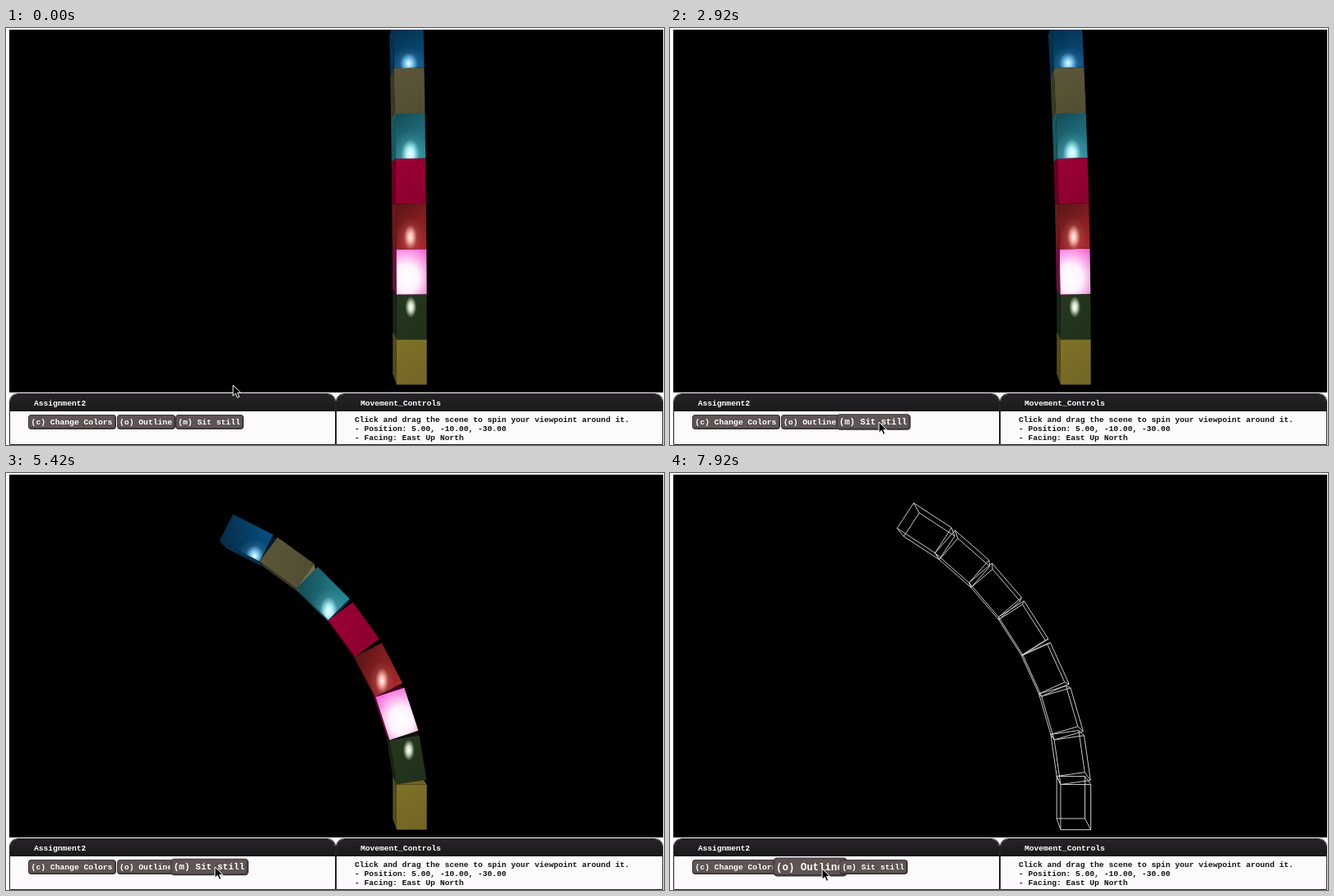
An HTML page with a canvas that plays this animation: 800x508 px, repeating every 8 s.

```html
<!DOCTYPE html>
<html lang="en">
<head>
<meta charset="utf-8">
<title>Swaying boxes</title>
<style>
  html, body { margin: 0; width: 100%; height: 100%; overflow: hidden; background: #fff; }
  #stage { position: relative; width: 800px; height: 508px; overflow: hidden;
    font: bold 9.6px/11px "Liberation Mono", monospace; white-space: pre; }
  #stage > * { position: absolute; }
  canvas { left: 0; top: 0; }
  .panel { box-sizing: border-box; top: 445px; height: 63px; background: #fdfafd;
    border: 1px solid #222; border-radius: 10px 10px 0 0; overflow: hidden; }
  .panel h1 { margin: 0; height: 21px; padding-left: 29px; background: linear-gradient(#262326, #1a181a);
    color: #fff; font: inherit; line-height: 24px; }
  .panel p { margin: 5px 0 0 22px; color: #111; }
  .button { box-sizing: border-box; top: 471px; height: 18px; border-radius: 4px;
    background: #5e5454; border: 1px solid #3c3535; border-width: 1px 2px 2px 1px;
    color: #fff; text-align: center; font-size: 9.7px; line-height: 17px; }
</style>
</head>
<body>
<div id="stage">
  <canvas id="scene" width="800" height="508"></canvas>
  <div class="panel" style="left:4px;width:397px"><h1>Assignment2</h1></div>
  <div class="panel" style="left:401px;width:398px"><h1>Movement_Controls</h1><p>Click and drag the scene to spin your viewpoint around it.
- Position: 5.00, -10.00, -30.00
- Facing: East Up North</p></div>
  <div class="button" style="left:27px;width:107px">(c) Change Colors</div>
  <div class="button" id="outline" style="left:135px;width:71px">(o) Outline</div>
  <div class="button" id="still" style="left:206px;width:83px">(m) Sit still</div>
  <svg id="cursor" width="14" height="19" style="left:-1px;top:-1px">
    <path d="M1 1V14.2L4.2 11.3 6.4 16.3 8.6 15.3 6.5 10.4H10.6Z" fill="#000" stroke="#fff"/>
  </svg>
</div>
<script>
const LOOP = 8000, FPS = 12;
const EYE = { x: 401.5, y: 223.5, focal: 532.3 };
const MAX_ANGLE = 0.05 * Math.PI;
const STILL_SPANS = [[2960, 4290], [5400, 6560]];
const STILL_PRESSES = [2870, 4230, 5340, 6510];
const OUTLINE_PRESSES = [7770];
const OUTLINE_FROM = 7850;
const CURSOR_PATH = [[0, 276, 435], [300, 276, 435], [830, 247, 483], [2250, 247, 483],
  [2600, 254, 480], [6850, 254, 480], [7500, 185, 482]];

// Bottom to top. spot: dx upright, extra dx at full bend, dy, radii
const BOXES = [
  { color: [122, 110, 38], ends: 0.9 },
  { color: [36, 53, 29], spot: [-1, 2, -12, 7, 13], glow: [220, 232, 208] },
  { color: [250, 100, 215], side: [110, 15, 62], spot: [-6, 11, 8, 36, 42], glow: [255, 250, 255] },
  { color: [158, 36, 40], spot: [-1, 5, 13, 8, 15], glow: [255, 185, 172], dark: true },
  { color: [150, 0, 50] },
  { color: [35, 128, 143], spot: [0, 7, 22, 11, 18], glow: [180, 250, 255], dark: true },
  { color: [88, 84, 54], ends: 1.3 },
  { color: [7, 74, 120], spot: [0, 10, 22, 11, 13], glow: [130, 210, 255], dark: true }
];
// Corner index: bit 0 right, bit 1 top, bit 2 back
const FACES = { front: [0, 1, 3, 2], left: [4, 0, 2, 6], right: [1, 5, 7, 3], top: [2, 3, 7, 6], bottom: [4, 5, 1, 0] };
const SHADES = { left: 0.68, right: 0.6, top: 0.4, bottom: 0.3 };

const $ = id => document.getElementById(id);
const ctx = $("scene").getContext("2d");
const rgba = (c, alpha = 1) => `rgba(${c.map(Math.round).join()},${alpha})`;
const shade = (c, k) => c.map(v => v * k);

function project(x, y, z) {
  const k = EYE.focal / z;
  return [EYE.x + x * k, EYE.y - y * k];
}

function swayAngle(t) {
  if (STILL_SPANS.some(([from, to]) => t >= from && t < to)) return MAX_ANGLE;
  return MAX_ANGLE / 2 * (1 - Math.cos(2.098 * t / 1000 - 0.265));
}

// Each box is hinged on the top left edge of the one below.
function buildStack(angle) {
  let x = 4, y = -11.5;
  return BOXES.map((look, i) => {
    const c = Math.cos(i * angle), s = Math.sin(i * angle);
    const at = (u, v) => [x + u * c - v * s, y + u * s + v * c];
    const corners = [...Array(8).keys()].map(n =>
      project(...at(n & 1 ? 2 : 0, n & 2 ? 3 : 0), n & 4 ? 31 : 29));
    const middle = at(1, 1.5);
    const box = { look, corners, center: project(...middle, 29), distance: Math.hypot(...middle) };
    [x, y] = at(0, 3);
    return box;
  });
}

function tracePath(points) {
  ctx.beginPath();
  points.forEach(p => ctx.lineTo(...p));
  ctx.closePath();
}

function facesCamera(p) {
  return (p[1][0] - p[0][0]) * (p[2][1] - p[0][1]) - (p[1][1] - p[0][1]) * (p[2][0] - p[0][0]) < 0;
}

function glowAt(x, y, rx, ry, stops) {
  ctx.save();
  ctx.translate(x, y);
  ctx.scale(rx, ry);
  const g = ctx.createRadialGradient(0, 0, 0, 0, 0, 1);
  stops.forEach(([at, color]) => g.addColorStop(at, color));
  ctx.fillStyle = g;
  ctx.fillRect(-1, -1, 2, 2);
  ctx.restore();
}

function lightFront({ look, center: [cx, cy] }, bend) {
  const [dx, swing, dy, rx, ry] = look.spot;
  const x = cx + dx + swing * bend, y = cy + dy;
  if (look.dark)
    glowAt(x, y, rx * 2, ry * 1.6, [[0, rgba(look.glow, 0.3)], [1, rgba(look.glow, 0)]]);
  glowAt(x, y, rx, ry, [[0, "#fff"], [0.4, rgba(look.glow, 0.95)],
    [0.7, rgba(look.glow, 0.45)], [1, rgba(look.glow, 0)]]);
}

function drawSolid(box, bend) {
  const { look, corners } = box;
  for (const [name, ids] of Object.entries(FACES)) {
    const points = ids.map(n => corners[n]);
    if (!facesCamera(points)) continue;
    tracePath(points);
    if (name !== "front") {
      const isEnd = name === "top" || name === "bottom";
      const k = isEnd && look.ends || SHADES[name];
      ctx.fillStyle = rgba(look.side ? shade(look.side, k / SHADES.left) : shade(look.color, k));
      ctx.fill();
      continue;
    }
    const g = ctx.createLinearGradient(...corners[2], ...corners[1]);
    g.addColorStop(0, rgba(shade(look.color, look.dark ? 0.58 : 1.04)));
    g.addColorStop(1, rgba(shade(look.color, look.dark ? 1.08 : 0.92)));
    ctx.fillStyle = g;
    ctx.fill();
    if (look.spot) {
      ctx.save();
      ctx.clip();
      lightFront(box, bend);
      ctx.restore();
    }
  }
}

function drawWire({ corners }) {
  ctx.strokeStyle = "#c8c8c8";
  ctx.lineWidth = 1;
  ctx.beginPath();
  for (let n = 0; n < 8; n++)
    for (const bit of [1, 2, 4])
      if (!(n & bit)) {
        ctx.moveTo(...corners[n]);
        ctx.lineTo(...corners[n | bit]);
      }
  ctx.stroke();
}

function drawScene(t) {
  const angle = swayAngle(t);
  ctx.clearRect(0, 0, 800, 508);
  ctx.save();
  ctx.beginPath();
  ctx.rect(4, 2, 795, 442);
  ctx.clip();
  ctx.fillStyle = "#000";
  ctx.fillRect(0, 0, 800, 508);
  const stack = buildStack(angle).sort((a, b) => b.distance - a.distance);
  stack.forEach(box => t >= OUTLINE_FROM ? drawWire(box) : drawSolid(box, angle / MAX_ANGLE));
  ctx.restore();
}

function pressScale(t, presses) {
  const grow = p => {
    const d = t - p;
    return Math.max(0, d < 150 ? d / 150 : 1 - (d - 150) / 200);
  };
  return 1 + 0.28 * Math.max(...presses.map(grow));
}

function cursorAt(t) {
  const next = CURSOR_PATH.findIndex(p => p[0] > t);
  if (next < 0) return CURSOR_PATH.at(-1).slice(1);
  const [t0, x0, y0] = CURSOR_PATH[next - 1], [t1, x1, y1] = CURSOR_PATH[next];
  const k = (t - t0) / (t1 - t0), e = k * k * (3 - 2 * k);
  return [x0 + (x1 - x0) * e, y0 + (y1 - y0) * e];
}

function render(now) {
  const t = Math.floor(((now % LOOP) + 4) * FPS / 1000) * 1000 / FPS % LOOP;
  drawScene(t);
  $("still").style.transform = `scale(${pressScale(t, STILL_PRESSES)})`;
  $("outline").style.transform = `scale(${pressScale(t, OUTLINE_PRESSES)})`;
  const [x, y] = cursorAt(t);
  $("cursor").style.transform = `translate(${x}px,${y}px)`;
}

const start = performance.now();
function tick() {
  render(performance.now() - start);
  requestAnimationFrame(tick);
}
tick();
</script>
</body>
</html>
```
